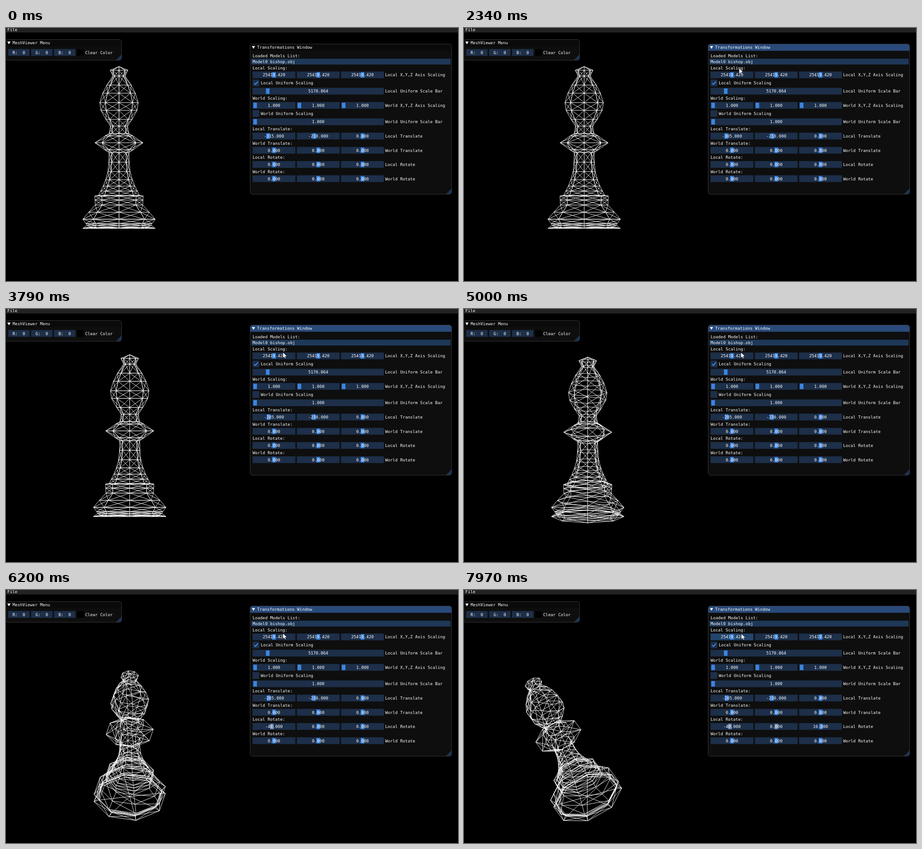
An HTML page with a canvas that plays this animation: 999x561 px, repeating every 8 s.

```html
<!DOCTYPE html>
<html lang="en">
<head>
<meta charset="utf-8">
<title>Mesh viewer</title>
<style>
  html, body { margin: 0; width: 100%; height: 100%; overflow: hidden; background: #000; }
  canvas { display: block; width: 999px; height: 561px; }
</style>
</head>
<body>
<canvas id="stage" width="999" height="561"></canvas>
<script>
const ctx = document.getElementById('stage').getContext('2d');
const LOOP = 8000, STEP = 69, PX = 0.79, SIDES = 8;
const FRAME = '#1d2f49', FRAME_HOT = '#23456c', GRAB = '#3d85e0', GRAB_USED = '#6d8cb3';

// Each burst: start time, then one value per step.
const tracks = {
  tx: { from: -315, bursts: [[2270, -305, -295, -265, -255, -245, -245], [2830, -265, -275, -285, -285]] },
  ty: { from: -210, bursts: [[3040, -220, -230, -240, -260, -290, -290], [3650, -260, -230, -230]] },
  rx: { from: 0, bursts: [[5000, 10, 30, 50, 50], [5530, 20, 0, -40, -40]] },
  ry: { from: 0, bursts: [[6200, 10, 40, 70, 70], [7160, 60, 40, 20, 0, 0]] },
  rz: { from: 0, bursts: [[7970, 20]] }
};

// Lathe profile: height above the base, radius.
const profile = [
  [359, 0], [351, 19.5], [338, 13.5], [318, 27], [300, 36], [279, 42.5], [262, 40],
  [242, 29], [227, 19], [211, 21.5], [205, 31], [190, 53], [175, 32], [168, 22],
  [147, 22.5], [126, 24.5], [108, 29.5], [94, 35], [83, 40.5], [73, 45.5], [72, 53.5],
  [63, 53], [52, 52.5], [36, 67], [20.5, 80], [11, 73], [7, 71], [0, 80], [3, 68], [3, 0]
];

// The panel shows a value one key press late while it is changing.
function sample({ from, bursts }, t) {
  let prev = from, value = from, used = false;
  for (const [start, ...steps] of bursts) {
    if (t < start) break;
    const i = Math.floor((t - start + 5) / STEP);
    const last = steps.length - 1;
    const before = value;
    value = steps[Math.min(i, last)];
    prev = i > last ? value : i ? steps[i - 1] : before;
    used = i > 0 || before !== from;
  }
  return { value, shown: value - 10 * Math.sign(value - prev), used };
}

function box(x, y, w, h, color) {
  ctx.fillStyle = color;
  ctx.fillRect(x, y, w, h);
}

function poly(points, color) {
  ctx.beginPath();
  points.forEach(([x, y]) => ctx.lineTo(x, y));
  ctx.closePath();
  ctx.fillStyle = color;
  ctx.fill();
}

function text(str, x, y, align = 'left') {
  ctx.save();
  ctx.translate(x, y + 3.1);
  ctx.scale(0.1, 0.1);
  ctx.font = '91.8px "DejaVu Sans Mono", monospace';
  ctx.textAlign = align;
  ctx.fillStyle = '#fff';
  ctx.fillText(str, 0, 0);
  ctx.restore();
}

function panel(x, y, w, h, title, active) {
  ctx.save();
  ctx.beginPath();
  ctx.roundRect(x, y, w, h, 5.5);
  ctx.clip();
  box(x, y, w, h, '#0e0e0e');
  box(x, y, w, 15, active ? '#294a7a' : '#0a0a0a');
  poly([[x + w, y + h], [x + w - 13, y + h], [x + w, y + h - 13]], '#1b3352');
  ctx.restore();
  ctx.beginPath();
  ctx.roundRect(x, y, w, h, 5.5);
  ctx.strokeStyle = '#3b3b42';
  ctx.lineWidth = 0.9;
  ctx.stroke();
  poly([[x + 4, y + 4.5], [x + 11, y + 4.5], [x + 7.5, y + 10.8]], '#fff');
  text(title, x + 15.4, y + 7.4);
}

function slider(x, y, w, pos, label, { hot, grab = GRAB } = {}) {
  box(x, y - 7.5, w, 15, hot ? FRAME_HOT : FRAME);
  box(x + 1.6 + pos * (w - 11.2), y - 6, 8, 12, grab);
  text(label, x + w / 2, y + 0.3, 'center');
}

function sliders(y, name, cells) {
  cells.forEach(([pos, label, opts], i) => slider(545 + i * 97.8, y, 94.6, pos, label, opts));
  text(name, 838, y + 0.3);
}

function signedRow(y, name, range, values) {
  sliders(y, name, values.map(v => {
    const s = v || { shown: 0 };
    const grab = range === 360 && s.used ? GRAB_USED : GRAB;
    return [0.5 + s.shown / range / 2, s.shown.toFixed(3), { grab }];
  }));
}

function checkbox(y, name, on) {
  box(545, y - 7.5, 15, 15, FRAME);
  if (on) {
    ctx.beginPath();
    ctx.moveTo(548.3, y);
    ctx.lineTo(551.2, y + 3.2);
    ctx.lineTo(557, y - 3.4);
    ctx.strokeStyle = '#4296fa';
    ctx.lineWidth = 1.8;
    ctx.stroke();
  }
  text(name, 563, y + 0.2);
}

function drawMesh(s) {
  const rad = d => d * Math.PI / 180;
  const [cx, sx, cy, sy, cz, sz] = [s.rx, s.ry, s.rz].flatMap(v => [Math.cos(rad(v.value)), Math.sin(rad(v.value))]);
  const ox = 498.6 + PX * s.tx.value, oy = 278.6 - PX * s.ty.value;

  const point = (row, k) => {
    const [h, r] = profile[row], a = k * 2 * Math.PI / SIDES;
    const x0 = r * Math.cos(a), z0 = r * Math.sin(a);
    const x1 = x0 * cy - z0 * sy, z = x0 * sy + z0 * cy;
    const x = x1 * cz - h * sz, y = x1 * sz + h * cz;
    return [ox + x, oy - (y * cx - z * sx)];
  };

  ctx.beginPath();
  const edge = (a, b) => { ctx.moveTo(...a); ctx.lineTo(...b); };
  for (let i = 0; i < profile.length; i++) {
    for (let k = 0; k < SIDES; k++) {
      const p = point(i, k);
      if (profile[i][1]) edge(p, point(i, k + 1));
      if (i + 1 === profile.length) continue;
      edge(p, point(i + 1, k));
      if (profile[i][1] && profile[i + 1][1]) edge(p, point(i + 1, k + 1));
    }
  }
  ctx.strokeStyle = '#fff';
  ctx.lineWidth = 0.9;
  ctx.stroke();
}

function cursorAt(t) {
  const glide = (start, end, [ax, ay], [bx, by], ease) => {
    const q = start + Math.floor((t - start + 5) / STEP) * STEP;
    const u = Math.min(1, Math.max(0, (q - start) / (end - start - 10)));
    const e = ease(u);
    return [ax + (bx - ax) * e, ay + (by - ay) * e];
  };
  const out = u => 1 - (1 - u) ** 2, linear = u => u;
  if (t < 130) return null;
  if (t < 1670) return glide(130, 880, [936, 505], [588, 70], out);
  if (t < 2480) return glide(1600, 2140, [588, 70], [608, 89], linear);
  if (t < 6340) return glide(2411, 2550, [608, 89], [612, 96], linear);
  return [613, 97];
}

function drawCursor(t) {
  const at = cursorAt(t);
  if (!at) return;
  const shape = [[0, 0], [0, 12.4], [2.8, 9.8], [4.9, 14], [6.8, 13.1], [4.9, 9.1], [9, 9]];
  const pts = shape.map(([x, y]) => [at[0] + x, at[1] + y]);
  poly(pts, '#fff');
  ctx.strokeStyle = '#000';
  ctx.lineWidth = 0.6;
  ctx.stroke();
}

function drawMenu() {
  box(0, 0, 999, 10, '#222');
  text('File', 3, 3.4);
  panel(-1, 25.5, 256.5, 46, 'MeshViewer Menu', false);
  ['R', 'G', 'B'].forEach((c, i) => {
    const x = 4.7 + i * 50.7;
    box(x, 46.7, 47.4, 15, FRAME);
    text(c + ':  0', x + 23.7, 54.5, 'center');
  });
  box(157, 46.7, 15, 15, '#000');
  text('Clear Color', 175, 54.5);
}

function drawTransforms(t, s) {
  panel(539.5, 35.5, 445.5, 333, 'Transformations Window', t >= 1340);
  text('Loaded Models List:', 545, 61.6);
  const row = t < 1340 || t >= 1670 ? '#1e3857' : t < 1410 ? '#4296fa' : '#377bcb';
  box(542, 68, 440.5, 13, row);
  text('Model0 bishop.obj', 545, 75);

  text('Local Scaling:', 545, 88.4);
  const big = '25419.420';
  sliders(104, 'Local X,Y,Z Axis Scaling', [[0.5, big, { hot: t >= 6340 }], [0.5, big], [0.5, big]]);
  checkbox(122, 'Local Uniform Scaling', true);
  slider(545, 140, 290, 0.1, '5170.864');
  text('Local Uniform Scale Bar', 838, 140.3);

  text('World Scaling:', 545, 156.2);
  sliders(171.6, 'World X,Y,Z Axis Scaling', Array(3).fill([0, '1.000']));
  checkbox(189.6, 'World Uniform Scaling', false);
  slider(545, 208, 290, 0, '1.000');
  text('World Uniform Scale Bar', 838, 208.3);

  [
    ['Local Translate', 1000, [s.tx, s.ty, null]],
    ['World Translate', 1000, [null, null, null]],
    ['Local Rotate', 360, [s.rx, s.ry, s.rz]],
    ['World Rotate', 360, [null, null, null]]
  ].forEach(([name, range, values], i) => {
    const y = 224 + i * 31.5;
    text(name + ':', 545, y);
    signedRow(y + 15.6, name, range, values);
  });
}

function draw(t) {
  const s = {};
  for (const key in tracks) s[key] = sample(tracks[key], t);
  box(0, 0, 999, 561, '#000');
  drawMesh(s);
  drawMenu();
  drawTransforms(t, s);
  drawCursor(t);
}

const begin = performance.now();
function tick() {
  draw((performance.now() - begin) % LOOP);
  requestAnimationFrame(tick);
}
tick();
</script>
</body>
</html>
```
